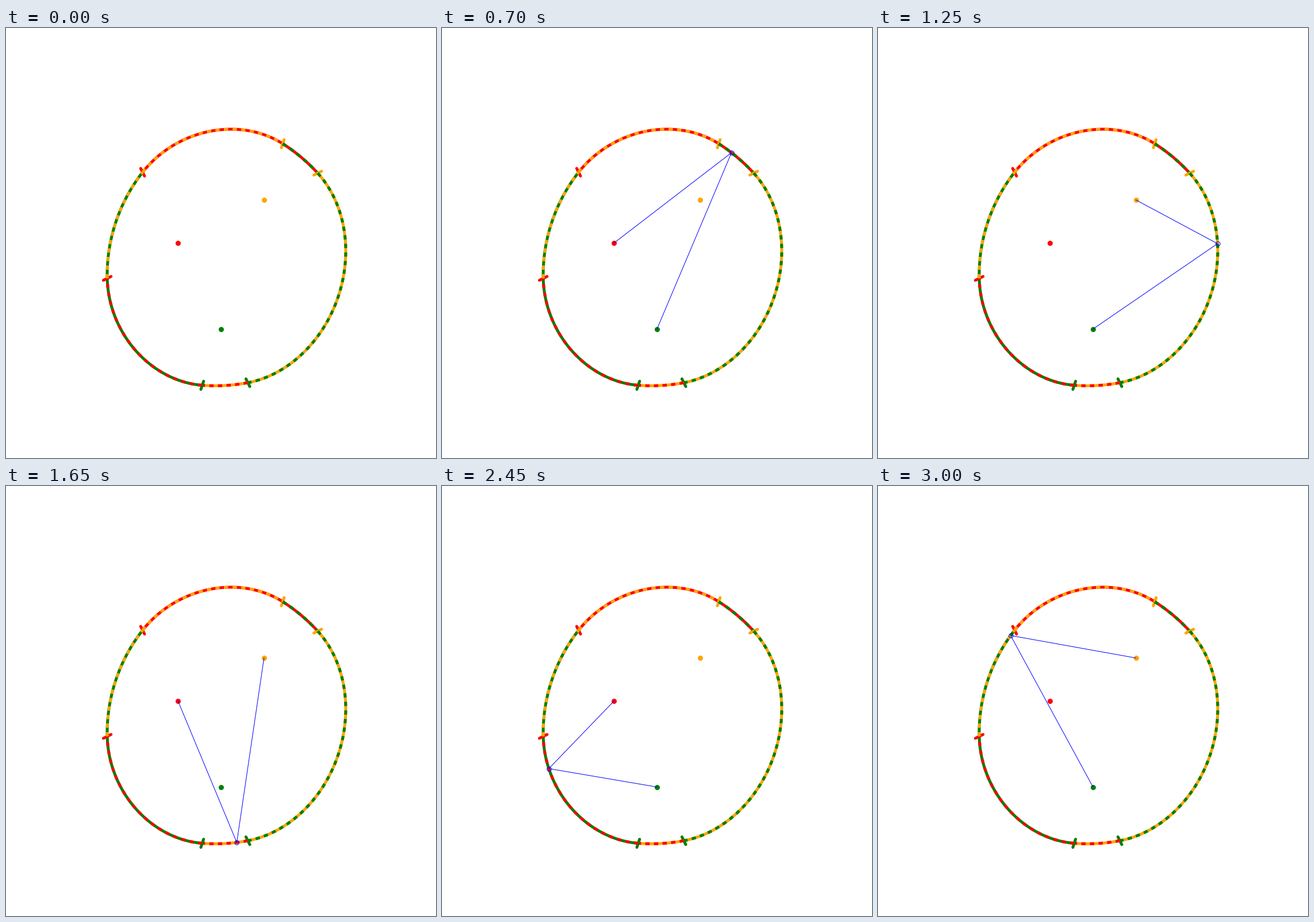
These frames come from a looping animation (748 px wide and 748 px high, 3.05 s). A matplotlib script:

```python
import numpy as np
import matplotlib.pyplot as plt
from matplotlib.animation import FuncAnimation

# Closed string pulled taut around a triangle: six elliptical arcs.
DPI = 88
PX = 72 / DPI            # points per pixel
UNIT = 74.8              # pixels per data unit
STEPS = 10               # positions shown on each arc
DASH = 0.1
TICK = 0.1
SLACK = 2.5

FOCI = {"red": (-1, 0), "orange": (1, 1), "green": (0, -2)}
FOCI = {name: np.array(p, float) for name, p in FOCI.items()}

# Clockwise: focus left behind, focus ahead, and the ray to the arc's start
ARCS = [
    ("red", "orange", ("green", "red")),
    ("red", "green", ("green", "orange")),
    ("orange", "green", ("red", "orange")),
    ("orange", "red", ("red", "green")),
    ("green", "red", ("orange", "green")),
    ("green", "orange", ("orange", "red")),
]


def dist(p, q):
    return np.hypot(*(p - q))


def angle(p, q):
    return np.arctan2(q[1] - p[1], q[0] - p[0])


def ellipse(focus, other, total, phi):
    """Points of an ellipse at polar angle phi around one focus."""
    d = dist(focus, other)
    r = (total**2 - d**2) / (2 * (total - d * np.cos(phi - angle(focus, other))))
    return focus[0] + r * np.cos(phi), focus[1] + r * np.sin(phi)


R, O, G = FOCI.values()
LENGTH = dist(R, O) + dist(O, G) + dist(G, R) + SLACK


def junction(far, near):
    third = next(c for c in FOCI if c not in (far, near))
    a, b, c = FOCI[far], FOCI[near], FOCI[third]
    return np.array(ellipse(a, c, LENGTH - dist(a, c), angle(a, b)))


JOINTS = [junction(*ray) for _, _, ray in ARCS]


def on_arc(k, t):
    """Points at fraction t of arc k."""
    back, ahead = (FOCI[c] for c in ARCS[k][:2])
    start, end = JOINTS[k], JOINTS[(k + 1) % len(JOINTS)]
    total = dist(start, back) + dist(start, ahead)
    a0 = angle(back, start)
    sweep = (a0 - angle(back, end)) % (2 * np.pi)
    return ellipse(back, ahead, total, a0 - sweep * t)


fig = plt.figure(figsize=(8.5, 8.5), dpi=DPI, facecolor="white")
ax = fig.add_axes([0, 0, 1, 1])
ax.set(xlim=(-5, 5), ylim=(-5, 5))
ax.axis("off")

WIDTH = 5
gap = DASH * UNIT / WIDTH
for k, (back, ahead, (far, near)) in enumerate(ARCS):
    u = FOCI[near] - FOCI[far]
    u = u / np.hypot(*u) * TICK
    ends = np.array([JOINTS[k] - u, JOINTS[k] + u])
    ax.plot(*ends.T, color=near, lw=WIDTH * PX, solid_capstyle="round", zorder=2 + k)
    x, y = on_arc(k, np.linspace(0, 1, 400))
    ax.plot(x, y, color=back, lw=WIDTH * PX, solid_capstyle="butt", zorder=2 + k)
    ax.plot(x, y, color=ahead, lw=WIDTH * PX, ls=(0, (gap, gap)),
            dash_capstyle="butt", zorder=2 + k)

for name, p in FOCI.items():
    ax.plot(*p, "o", color=name, ms=9 * PX, mew=0, zorder=10)

string, = ax.plot([], [], color="blue", lw=PX, zorder=11)
ring, = ax.plot([], [], "o", mfc="none", mec="blue", ms=7.5 * PX, mew=PX, zorder=12)


def update(n):
    if n == 0:
        string.set_data([], [])
        ring.set_data([], [])
    else:
        k, i = divmod(n - 1, STEPS)
        x, y = on_arc(k, (i + 0.5) / STEPS)
        a, b = (FOCI[c] for c in ARCS[k][:2])
        string.set_data([a[0], x, b[0]], [a[1], y, b[1]])
        ring.set_data([x], [y])
    return string, ring


anim = FuncAnimation(fig, update, frames=1 + STEPS * len(ARCS), interval=50,
                     repeat=True, blit=False)
plt.show()
```
